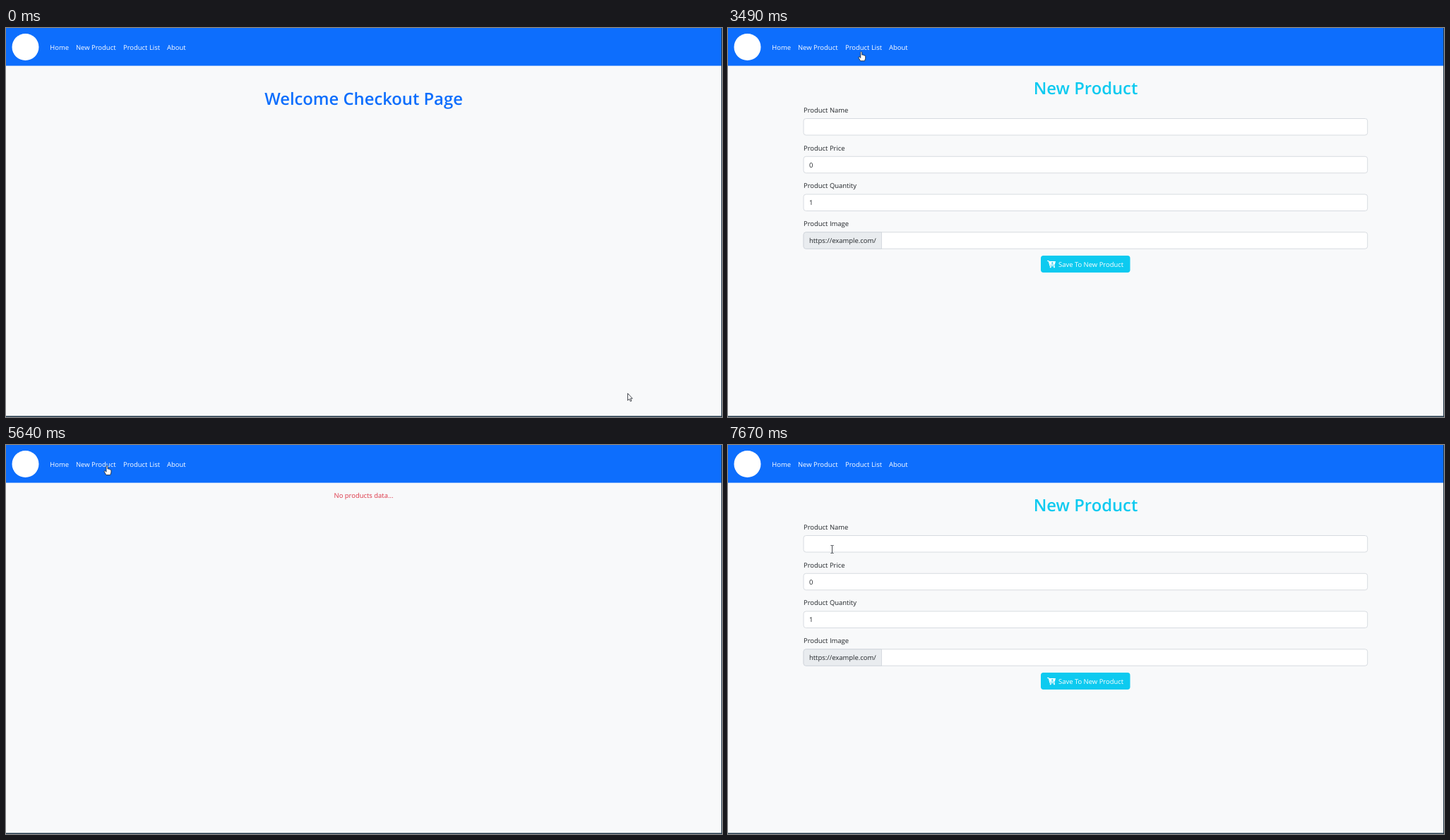
These frames come from a looping animation (1014x552 px, 8 s). An HTML page:

```html
<!DOCTYPE html>
<html lang="en">
<head>
<meta charset="utf-8">
<title>Checkout</title>
<style>
  html, body { margin: 0; width: 100%; height: 100%; overflow: hidden; background: #f8f9fa; }
  svg { display: block; width: 100%; height: 100%; }
  text { font: 9.45px "Open Sans", "Noto Sans", sans-serif; fill: #212529; text-rendering: geometricPrecision; }
  .title { font-size: 23.8px; font-weight: 600; fill: #0dcaf0; text-anchor: middle; }
  .box { fill: #fff; stroke: #ced4da; stroke-width: .8; }
  .addon { fill: #e9ecef; stroke: #ced4da; stroke-width: .8; }
  .white, .white text { fill: #fff; }
  #cursor path { fill: #fff; stroke: #1a1f26; stroke-width: .8; stroke-linejoin: round; }
</style>
</head>
<body>
<svg viewBox="0 0 1014 552" preserveAspectRatio="none">
  <rect width="1014" height="53.6" fill="#0d6efd"/>
  <circle class="white" cx="27.5" cy="27" r="19"/>
  <g class="white" id="links"></g>

  <text data-page="home" class="title" x="506.5" y="108.5" style="fill:#0d6efd">Welcome Checkout Page</text>
  <text data-page="about" class="title" x="506.5" y="108.5">About</text>
  <text data-page="list" x="506.5" y="75" text-anchor="middle" style="fill:#dc3545">No products data...</text>
  <g data-page="form">
    <text class="title" x="506.5" y="93.5">New Product</text>
    <g id="fields"></g>
    <path class="addon" d="M217.5 289.8h-107q-3.5 0-3.5 3.5v16.500q0 3.500 3.500 3.500h107z"/>
    <text x="115" y="305.200">https://example.com/</text>
    <rect x="443" y="323" width="126.500" height="24" rx="3.700" fill="#0dcaf0"/>
    <g class="white">
      <path d="M454.800 331H464l-1.300 5.200H456z"/>
      <path d="M452 330.500h2.200l1.800 7h7" fill="none" stroke="#fff" stroke-width="1.100"/>
      <circle cx="456.800" cy="339.300" r="1.100"/>
      <circle cx="462" cy="339.300" r="1.100"/>
      <path d="M459.300 332v3.400m-1.700-1.700h3.400" stroke="#0dcaf0" stroke-width=".8"/>
      <text x="468" y="338.800">Save To New Product</text>
    </g>
  </g>

  <path d="M1013.500 0V552" stroke="#22384a"/>
  <path d="M0 551.200H1014" stroke="#22384a" stroke-width="1.600"/>

  <g id="cursor">
    <path data-shape="arrow" d="M.5.5v10l2.300-2.100 1.500 3.400 1.600-.7-1.500-3.300h2.800z"/>
    <path data-shape="hand" d="M-1 1.300Q0-.6 1 1.300V5q1.200-.7 1.700.3 1.200-.5 1.600.6 1.600-.3 1.600 1.300V10l-1.200 3.500h-5.900L-3.900 8.800Q-4 7.300-2.400 7.800L-1 9.200z"/>
    <path data-shape="beam" d="M-2-5.500h1.500L0-5l.5-.5H2M0-5V5m-2 .5h1.500L0 5l.5.5H2" style="fill:none"/>
  </g>
</svg>
<script>
const LOOP = 8000, TICK = 67.9, CLICK_DELAY = 180;

// Where the pointer rests, and the page its click opens.
const stops = [
  { from: 0, to: 0, x: 880, y: 518 },
  { from: 610, to: 750, x: 70, y: 44 },
  { from: 1410, to: 1560, x: 80, y: 25, opens: "home" },
  { from: 2050, to: 2710, x: 127, y: 25, opens: "form" },
  { from: 3150, to: 3150, x: 160, y: 63 },
  { from: 3480, to: 3700, x: 189, y: 33, opens: "list" },
  { from: 4240, to: 4770, x: 240, y: 24, opens: "about" },
  { from: 5230, to: 5430, x: 184, y: 27, opens: "list" },
  { from: 5570, to: 6110, x: 143, y: 29, opens: "form" },
  { from: 6240, to: 6450, x: 182, y: 27 },
  { from: 6880, to: 6880, x: 202, y: 230 },
  { from: 7270, to: 7270, x: 177, y: 132 },
  { from: 7660, to: LOOP, x: 147.5, y: 148 }
];

const byId = id => document.getElementById(id);
const fieldTop = i => 128.5 + 53.75 * i;

const links = { "Home": 62.3, "New Product": 99, "Product List": 166, "About": 228 };
byId("links").innerHTML = Object.entries(links)
  .map(([name, x]) => `<text x="${x}" y="30.7">${name}</text>`).join("");

const fields = { Name: "", Price: "0", Quantity: "1", Image: "" };
byId("fields").innerHTML = Object.entries(fields).map(([name, value], i) => {
  const y = fieldTop(i);
  return `<text x="107" y="${y - 8.7}">Product ${name}</text>
    <rect class="box" x="107" y="${y}" width="798.7" height="23.5" rx="3.5"/>
    <text x="115" y="${y + 15.4}">${value}</text>`;
}).join("");

function show(key, name) {
  document.querySelectorAll(`[data-${key}]`).forEach(el => {
    el.style.display = el.dataset[key] === name ? "" : "none";
  });
}

function pointerAt(t) {
  const i = stops.findLastIndex(s => s.from <= t);
  const a = stops[i], b = stops[i + 1];
  if (t <= a.to || !b) return [a.x, a.y];
  const u = (t - a.to) / (b.from - a.to), e = u * u * (3 - 2 * u);
  return [a.x + (b.x - a.x) * e, a.y + (b.y - a.y) * e];
}

function pageAt(t) {
  return stops.findLast(s => s.opens && s.from + CLICK_DELAY <= t)?.opens ?? "home";
}

function shapeAt(x, y, page) {
  if (y > 14 && y < 40 && x > 57 && x < 261) return "hand";
  const inField = (y - fieldTop(0)) % 53.75;
  const overField = inField > 0 && inField < 23.5 && y < 313 && x > 107 && x < 906;
  return page === "form" && overField ? "beam" : "arrow";
}

function draw(now) {
  const t = Math.floor((now % LOOP + 8) / TICK) * TICK;
  const page = pageAt(t + 8), [x, y] = pointerAt(t);
  show("page", page);
  show("shape", shapeAt(x, y, page));
  byId("cursor").setAttribute("transform", `translate(${x} ${y})`);
}

const start = performance.now();
function frame() {
  draw(performance.now() - start);
  requestAnimationFrame(frame);
}
frame();
</script>
</body>
</html>
```
